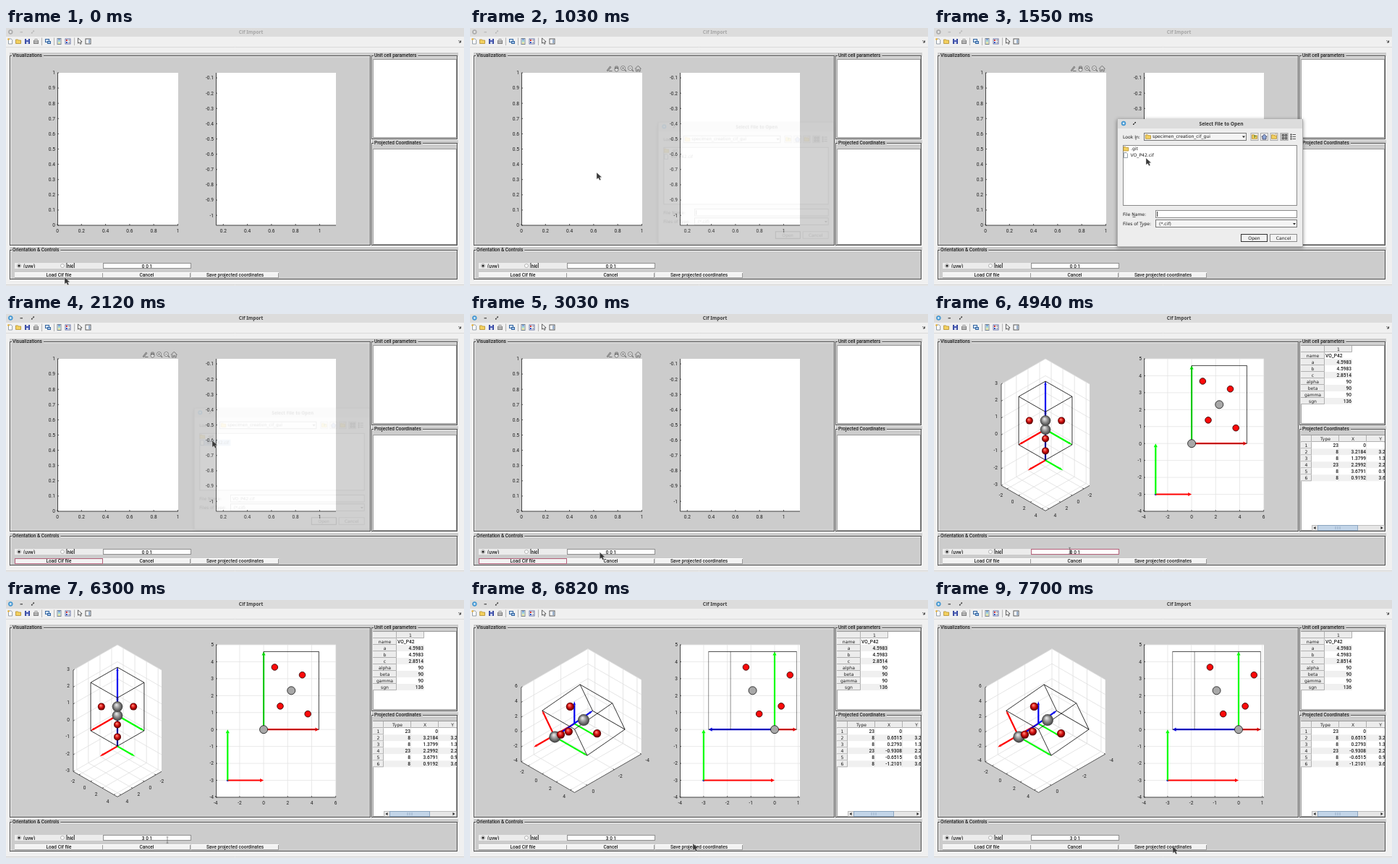
An HTML page with a canvas that plays this animation: 633x357 px, repeating every 8000 ms.

```html
<!DOCTYPE html>
<html lang="en">
<head>
<meta charset="utf-8">
<title>Cif Import</title>
<style>
html, body { margin: 0; width: 100%; height: 100%; overflow: hidden; background: #f0f0f0; }
canvas { display: block; width: 100vw; height: 100vh; }
</style>
</head>
<body>
<canvas id="stage"></canvas>
<script>
const W = 633, H = 357, LOOP = 8000;
const dpr = window.devicePixelRatio || 1;
function context(canvas) {
  canvas.width = W * dpr;
  canvas.height = H * dpr;
  const ctx = canvas.getContext('2d');
  ctx.scale(dpr, dpr);
  return ctx;
}
const layer = context(document.createElement('canvas'));
let g = context(document.getElementById('stage'));

const UI = 'Roboto, sans-serif', JAVA = '"DejaVu Sans", sans-serif', TITLE = '"Noto Sans", sans-serif';
const PANEL = '#cccccc', INK = '#1c1c1c', PINK = '#b4607a';
const RED = '#ff0000', GREEN = '#00ff00', BLUE = '#0000f0';

// ---- drawing helpers
function rect(x, y, w, h, fill, stroke) {
  if (fill) { g.fillStyle = fill; g.fillRect(x, y, w, h); }
  if (stroke) { g.strokeStyle = stroke; g.lineWidth = 1; g.strokeRect(x + .5, y + .5, w - 1, h - 1); }
}
function path(points, stroke, width = 1, fill, close) {
  g.beginPath();
  points.forEach(([x, y], i) => i ? g.lineTo(x, y) : g.moveTo(x, y));
  if (close) g.closePath();
  if (fill) { g.fillStyle = fill; g.fill(); }
  if (stroke) { g.strokeStyle = stroke; g.lineWidth = width; g.stroke(); }
}
const line = (x1, y1, x2, y2, color, width) => path([[x1, y1], [x2, y2]], color, width);
function disc(x, y, r, fill, stroke, width = 1) {
  g.beginPath();
  g.arc(x, y, r, 0, 7);
  if (fill) { g.fillStyle = fill; g.fill(); }
  if (stroke) { g.strokeStyle = stroke; g.lineWidth = width; g.stroke(); }
}
// y is the middle of the capitals
function text(s, x, y, align = 'left', font = UI, size = 6.5, weight = 500, color = INK) {
  g.font = `${weight} ${size}px ${font}`;
  g.textAlign = align;
  g.fillStyle = color;
  g.fillText(s, x, y + size * .36);
}
const tick = (s, x, y, align = 'center') => text(String(s), x, y, align, UI, 6.6, 400);
const java = (s, x, y, align) => text(s, x, y, align, JAVA, 6.1, 400);
const value = (s, x, y, align) => text(s, x, y, align, UI, 6.6, 500);
function clipped(x, y, w, h, draw) {
  g.save();
  g.beginPath();
  g.rect(x, y, w, h);
  g.clip();
  draw();
  g.restore();
}
function arrow(a, b, color, head) {
  const dx = b[0] - a[0], dy = b[1] - a[1], n = Math.hypot(dx, dy);
  if (n < 1) return disc(a[0], a[1], 1.5, color);
  const ux = dx / n, uy = dy / n, bx = b[0] - ux * 5, by = b[1] - uy * 5;
  line(a[0], a[1], bx, by, color, 2.2);
  path([b, [bx - uy * head, by + ux * head], [bx + uy * head, by - ux * head]], null, 0, color, true);
}
const range = (a, b, step = 1) => {
  const out = [];
  for (let v = Math.ceil(a / step) * step; v <= b + 1e-6; v += step) out.push(+v.toFixed(2) || 0);
  return out;
};

// ---- window frame
function titleButton(x, y, active) {
  disc(x, y, 2.9, active ? '#55a5dc' : '#b4b4b4', active ? '#2f86c4' : '#a4a4a4', .7);
  disc(x, y, 1.2, '#f4f4f4');
}
function expandMark(x, y, color) {
  line(x - 1.6, y + 1.6, x + 1.6, y - 1.6, color, .8);
  path([[x, y - 2], [x + 2, y - 2], [x + 2, y]], null, 0, color, true);
  path([[x, y + 2], [x - 2, y + 2], [x - 2, y]], null, 0, color, true);
}
function folder(x, y) {
  path([[x - 3.5, y - 2.5], [x - .5, y - 2.5], [x + .3, y - 1.5], [x + 3.5, y - 1.5], [x + 3.5, y + 3], [x - 3.5, y + 3]],
    '#a8821e', .7, '#f3d060', true);
}
function page(x, y) {
  path([[x - 2.5, y - 3.5], [x + 1, y - 3.5], [x + 2.5, y - 2], [x + 2.5, y + 3.5], [x - 2.5, y + 3.5]], '#6c7a88', .7, '#fff', true);
}
function arrowShape(x, y, k, fill, stroke) {
  const pts = [[0, 0], [0, 9], [2.3, 7.3], [4, 10.4], [5.7, 9.6], [4.3, 6.6], [7, 6.3]];
  path(pts.map(p => [x + p[0] * k, y + p[1] * k]), stroke, .7, fill, true);
}
function toolbar() {
  page(6, 18.5);
  disc(3.5, 15.5, 1.3, '#e8b030');
  folder(17, 18.5);
  rect(26, 15, 7, 7, '#4a5cb4', '#33449a');
  rect(28, 15, 3, 2, '#dfe4f4');
  rect(28, 19, 3, 3, '#c8d0ea');
  rect(38, 17, 7, 5, '#b4b4b4', '#808080');
  rect(39.5, 15, 4, 3, '#f8f8f8', '#909090');
  rect(54, 15, 6, 5, '#cfe0f4', '#3566a0');
  rect(57, 18, 5, 4, '#9cc0e8', '#3566a0');
  rect(70.5, 14, 6, 9, '#fff', '#76828e');
  ['#7fa6e0', '#9ad8d0', '#e8e4a0'].forEach((c, i) => rect(72, 15 + i * 2.3, 3, 2.3, c));
  rect(81.5, 14.5, 8, 8, '#fff', '#6470a4');
  [['#d03030', 17], ['#3050c0', 20]].forEach(([c, y]) => {
    rect(83, y - 1, 2, 2, c);
    line(86, y, 88.3, y, '#555', .8);
  });
  arrowShape(99.5, 14, .8, '#fff', '#222');
  rect(109.5, 14.5, 8, 8, '#fff', '#555');
  rect(114, 16, 2.5, 5, '#9ab0cc');
  [49.5, 66.5, 94.5].forEach(x => line(x, 13.5, x, 24, '#b4b4b4', 1));
  path([[625.5, 17], [628.5, 20], [628.5, 17.5], [628.5, 20], [626, 20]], '#333', .9);
}
// Etched border: a dark outline with a light one a pixel down and right
function panel(x, y, w, h, title) {
  rect(x, y, w, h, PANEL);
  rect(x + 1, y + 5, w - 1, h - 5, null, '#f6f6f6');
  rect(x, y + 4, w - 1, h - 5, null, '#4c4c4c');
  g.font = `500 6.5px ${UI}`;
  rect(x + 3, y + 2, g.measureText(title).width + 3, 6, PANEL);
  text(title, x + 4, y + 4);
}
function button(x, w, label, focus) {
  rect(x, 338, w, 8, '#f3f3f3');
  line(x, 345.5, x + w, 345.5, '#999', 1);
  line(x + w - .5, 338, x + w - .5, 346, '#999', 1);
  line(x, 338.5, x + w, 338.5, '#ffffff', 1);
  if (focus) rect(x, 338, w, 8, null, PINK);
  text(label, x + w / 2, 341.8, 'center');
}
function controls(s) {
  rect(12, 325, 122, 8, '#ececec');
  clipped(12, 325, 122, 7, () => {
    disc(18, 329, 2.5, '#fff', '#888', .7);
    disc(18, 329, 1.5, '#111');
    disc(78, 329, 2.5, '#fff', '#999', .7);
    text('(uvw)', 24, 329.2);
    text('[hkl]', 83, 329.2);
  });
  rect(134, 325, 122, 8, '#fff', s.editFocus ? PINK : '#8e8e8e');
  clipped(135, 325, 120, 8, () => {
    if (s.selected) rect(188.5, 326, 13, 6, '#9fc3e8');
    text(s.entry, 195, 329.2, 'center');
  });
  if (s.caret) line(189, 326, 189, 332, '#111', .7);
  button(12, 122, 'Load Cif file', s.loadFocus);
  button(134, 121, 'Cancel');
  button(256, 121, 'Save projected coordinates');
}
function axesTools() {
  const c = '#707070', y = 56;
  path([[189, 59], [193.5, 53], [195, 54.2], [190.8, 59.4]], c, .8, '#a0a0a0', true);
  line(192, 59.5, 196.5, 59.5, c, 1);
  disc(202.5, 57.5, 2.6, '#e4e4e4', c, .9);
  [200.4, 201.8, 203.3, 204.8].forEach((x, i) => line(x, 57, x, i % 3 ? 52.3 : 53.4, c, .9));
  [212, 222].forEach((x, i) => {
    disc(x - .5, y - .5, 3, '#e4e4e4', c, .9);
    line(x + 1.7, y + 1.7, x + 4, y + 4, c, 1.2);
    line(x - 2, y - .5, x + 1, y - .5, c, .8);
    if (!i) line(x - .5, y - 2, x - .5, y + 1, c, .8);
  });
  path([[228, 56.5], [232.3, 52.2], [236.6, 56.5]], c, 1);
  path([[229.5, 56], [229.5, 60], [231.5, 60], [231.5, 57.5], [233.2, 57.5], [233.2, 60], [235.2, 60], [235.2, 56]], c, .9);
}

// ---- plots
const CELL = 4.5983, HEIGHT = 2.8514;
const ATOMS = [
  ['V', 0, 0, 0], ['O', 3.2184, 3.2184, 0], ['O', 1.3799, 1.3799, 0],
  ['V', 2.2992, 2.2992, HEIGHT / 2], ['O', 3.6791, .9192, HEIGHT / 2], ['O', .9192, 3.6791, HEIGHT / 2]
];
// Turn that brings the zone axis [u 0 w] upright
function zone(u, w) {
  const n = Math.hypot(u * CELL, w * HEIGHT);
  return { c: w * HEIGHT / n, s: u * CELL / n };
}
const VIEWS = [
  { ...zone(0, 1), o: [154, 159.8], u: [[-8.03, 4.6], [8.03, 4.6], [0, -23.4]], lim: [[-3, 4.6], [-3, 4.6], [-3, 3]],
    zStep: 1, r: { V: 7.3, O: 5 }, x0: 356.1, sx: 16.6, xLim: [-4, 6], xStep: 2 },
  { ...zone(3, 1), o: [117.3, 189.4], u: [[-18.7, 10.8], [9.7, 5.6], [0, -10.3]], lim: [[-4, .93], [-3, 4.6], [-4, 6]],
    zStep: 2, r: { V: 8, O: 5.6 }, x0: 421, sx: 32.7, xLim: [-4, 1], xStep: 1 }
];
const turn = (v, [x, y, z]) => [v.c * x - v.s * z, y, v.s * x + v.c * z];
const project = (v, p) => [0, 1].map(k => v.o[k] + p.reduce((sum, q, i) => sum + q * v.u[i][k], 0));
const depth = (v, [x, y, z]) => 1.414 * (v.u[0][1] * x + v.u[1][1] * y) - .707 * v.u[2][1] * z;

// Cell edges as pairs of turned points; `near` picks those that meet the corner at zero
function edges(v, near) {
  const size = [CELL, CELL, HEIGHT], out = [];
  for (let n = 0; n < 8; n++) for (let k = 0; k < 3; k++) {
    if (n >> k & 1 || (n === 0) !== near) continue;
    const corner = m => turn(v, size.map((q, i) => (m >> i & 1) * q));
    out.push([corner(n), corner(n | 1 << k)]);
  }
  return out;
}
function vectors(v, map, head) {
  const colors = [RED, GREEN, BLUE], unit = k => [0, 1, 2].map(i => +(i === k));
  const order = [2, 0, 1];
  order.forEach(k => arrow(map([-3, -3, -3]), map(unit(k).map(q => q * 3 - 3)), colors[k], head));
  order.forEach(k => {
    const len = k === 2 ? HEIGHT : CELL;
    arrow(map([0, 0, 0]), map(turn(v, unit(k).map(q => q * len))), colors[k], head);
  });
}
function cellAndArrows(v, map, head, width) {
  const draw = near => edges(v, near).forEach(([a, b]) => line(...map(a), ...map(b), '#000', width));
  draw(true);
  vectors(v, map, head);
  draw(false);
}
function sphere(x, y, r, el) {
  const k = g.createRadialGradient(x - r * .2, y - r * .35, r * .1, x, y, r);
  const stops = el === 'V' ? ['#e0e0e0', '#8c8c8c', '#3c3c3c'] : ['#ff8070', '#d00c0c', '#4c0000'];
  stops.forEach((c, i) => k.addColorStop([0, .5, 1][i], c));
  disc(x, y, r, k);
}
function plot3d(v) {
  const [[xa, xb], [ya, yb], [za, zb]] = v.lim;
  const P = (...p) => project(v, p);
  path([P(xb, ya, zb), P(xa, ya, zb), P(xa, yb, zb), P(xa, yb, za), P(xb, yb, za), P(xb, ya, za)], null, 0, '#fff', true);
  const grid = '#dfdfdf', xs = range(xa, xb, 2), ys = range(ya, yb, 2), zs = range(za, zb, v.zStep);
  xs.forEach(x => path([P(x, yb, za), P(x, ya, za), P(x, ya, zb)], grid, .8));
  ys.forEach(y => path([P(xb, y, za), P(xa, y, za), P(xa, y, zb)], grid, .8));
  zs.forEach(z => path([P(xb, ya, z), P(xa, ya, z), P(xa, yb, z)], grid, .8));
  path([P(xb, ya, zb), P(xb, ya, za), P(xb, yb, za), P(xa, yb, za)], '#303030', .8);
  xs.forEach(x => {
    const [px, py] = P(x, yb, za);
    line(px, py, px - 1.7, py - 1, '#303030', .8);
    tick(x, px + 8.5, py + 8.6);
  });
  ys.forEach(y => {
    const [px, py] = P(xb, y, za);
    line(px, py, px + 1.7, py - 1, '#303030', .8);
    tick(y, px - 8.5, py + 8.6);
  });
  zs.forEach(z => {
    const [px, py] = P(xb, ya, z);
    line(px, py, px + 1.7, py - 1, '#303030', .8);
    tick(z, px - 5, py - 1.8, 'right');
  });
  cellAndArrows(v, p => project(v, p), 1.6, .8);
  ATOMS.map(([el, ...p]) => [el, turn(v, p)])
    .sort((a, b) => depth(v, a[1]) - depth(v, b[1]))
    .forEach(([el, p]) => sphere(...project(v, p), v.r[el], el));
}
function plot2d(v) {
  const X = x => v.x0 + x * v.sx, Y = y => 179.2 - y * 23.44;
  frame(290, 456);
  range(...v.xLim, v.xStep).forEach(x => {
    line(X(x), 62, X(x), 273, '#e4e4e4', .8);
    tickX(x, X(x));
  });
  range(-4, 5).forEach(y => {
    line(290, Y(y), 456, Y(y), '#e4e4e4', .8);
    tickY(y, 290, Y(y));
  });
  axisLines(290, 456);
  cellAndArrows(v, ([x, y]) => [X(x), Y(y)], 2.6, .45);
  ATOMS.forEach(([el, ...p]) => {
    const [x, y] = turn(v, p), big = el === 'V';
    disc(X(x), Y(y), big ? 5.5 : 4.3, big ? '#a8a8a8' : '#ff0a0a', big ? '#222' : '#300000', .9);
  });
}
const frame = (x1, x2) => rect(x1, 62, x2 - x1, 211, '#fff');
const axisLines = (x1, x2) => path([[x1 + .5, 62], [x1 + .5, 273], [x2, 273]], '#303030', .9);
function tickX(label, x) {
  line(x, 273, x, 271, '#303030', .8);
  tick(label, x, 280.3);
}
function tickY(label, x, y) {
  line(x, y, x + 2, y, '#303030', .8);
  tick(label, x - 3, y, 'right');
}
function emptyPlots() {
  frame(71, 238);
  axisLines(71, 238);
  range(0, 1, .2).forEach(v => tickX(v, 71 + v * 166.5));
  range(0, 1, .1).forEach(v => tickY(v, 71, 273 - v * 211));
  frame(290, 456);
  axisLines(290, 456);
  range(.2, 1, .2).forEach(v => tickX(v, 267 + v * 166.5));
  range(-1, -.1, .1).forEach(v => tickY(v, 290, 47.9 - v * 211.3));
}

// ---- tables
const stripe = i => i % 2 ? '#f0f0f0' : '#fff';
function headCell(x, y, w, label) {
  rect(x, y, w, 9, '#ececec');
  path([[x, y + 8.5], [x + w - .5, y + 8.5], [x + w - .5, y]], '#a2a2a2', .8);
  java(label, x + w / 2, y + 4.6, 'center');
}
function cellTable(filled) {
  const rows = { name: 'VO_P42', a: '4.5983', b: '4.5983', c: '2.8514', alpha: '90', beta: '90', gamma: '90', sgn: '136' };
  headCell(507, 44, 33, '');
  headCell(540, 44, 38, '1');
  Object.keys(rows).forEach((key, i) => {
    const y = 53 + i * 9;
    headCell(507, y, 33, key);
    rect(540, y, 38, 9, stripe(i));
    if (filled) value(rows[key], i ? 577 : 541, y + 4.6, i ? 'right' : 'left');
  });
}
function coordTable(view) {
  clipped(507, 167, 116, 133, () => {
    headCell(507, 168, 15, '');
    ['Type', 'X', 'Y'].forEach((h, i) => headCell(522 + i * 38, 168, 38, h));
    ATOMS.forEach(([el, ...p], i) => {
      const y = 177.3 + i * 9;
      headCell(507, y, 15, String(i + 1));
      rect(522, y, 114, 9, stripe(i));
      [560, 598].forEach(x => line(x - .5, y, x - .5, y + 9, '#e0e0e0', .7));
      if (!view) return;
      const [x, yy] = turn(view, p), show = n => n ? n.toFixed(4) : '0';
      [el === 'V' ? '23' : '8', show(x), show(yy)].forEach((s, k) => value(s, 559 + k * 38, y + 4.6, 'right'));
    });
    rect(522, 292, 101, 8, '#e6e6e6', '#bcbcbc');
    rect(530, 292, 56, 8, '#c3d5e8', '#8ba4bf');
    [555, 558, 561].forEach(x => line(x, 294, x, 298, '#8ba4bf', .8));
    path([[527.5, 294], [524.5, 296], [527.5, 298]], null, 0, '#222', true);
    path([[617.5, 294], [620.5, 296], [617.5, 298]], null, 0, '#222', true);
  });
}

// ---- file dialog
const dropMark = (x, y) => path([[x - 2, y - 1], [x + 2, y - 1], [x, y + 1.5]], null, 0, '#222', true);
function dialog(selected) {
  g.save();
  g.shadowColor = 'rgba(0,0,0,.45)';
  g.shadowBlur = 5 * dpr;
  g.shadowOffsetY = dpr;
  rect(253, 126, 257, 177, '#ededed');
  g.restore();
  rect(253, 126, 257, 177, '#ededed', '#b0b0b0');
  rect(254, 126, 255, 13, '#dcdcdc');
  titleButton(262, 132, true);
  expandMark(277, 132, '#222');
  text('Select File to Open', 397, 132.4, 'center', TITLE, 6.6, 600, '#333');
  java('Look In:', 261, 150.5);
  line(278, 154, 280, 154, INK, .6);
  rect(290, 145, 142, 11, '#f4f4f4', '#777');
  folder(296, 150.3);
  java('specimen_creation_cif_gui', 302, 150.3);
  dropMark(428, 150.5);
  [443, 456.5, 470, 484, 496].forEach((x, i) => rect(x - 5.5, 145, 11, 11, i === 3 ? '#c4c4c4' : '#eee', i < 4 ? '#aaa' : null));
  folder(443, 150.3);
  path([[443, 152], [443, 148.5], [445, 150.5]], '#307030', .9);
  path([[453, 150.5], [456.5, 147], [460, 150.5], [459, 150.5], [459, 154], [454, 154], [454, 150.5]], '#335', .8, '#8fa8d8', true);
  folder(470, 150.3);
  disc(472.5, 148, 1.3, '#fff', '#b08020', .6);
  for (let i = 0; i < 4; i++) rect(481 + i % 2 * 4, 147 + (i >> 1) * 4, 3, 3, '#fff', '#444');
  [147.5, 150.5, 153.5].forEach(y => { rect(492.5, y - 1, 2, 2, '#444'); line(495.5, y, 500, y, '#444', .9); });
  rect(261, 162, 241, 84, '#fff', '#8a8a8a');
  if (selected) rect(261.5, 171.5, 45, 9, '#a9c4e2');
  folder(265.3, 167);
  page(265, 176);
  java('.git', 272, 167);
  java('VO_P42.cif', 271.5, 176);
  java('File Name:', 261, 258);
  line(274.5, 261.5, 278.5, 261.5, INK, .6);
  rect(306, 252, 196, 11, '#fff', '#8a8a8a');
  if (selected) java('VO_P42.cif', 309, 257.6);
  else line(308.7, 254, 308.7, 261, '#111', .9);
  java('Files of Type:', 261, 271.3);
  line(285, 274.8, 288.5, 274.8, INK, .6);
  rect(306, 265, 196, 11, '#f4f4f4', '#777');
  java('(*.cif)', 311, 270.6);
  dropMark(498, 271);
  rect(424, 285, 37, 11, '#f2f2f2', '#333');
  java('Open', 442.5, 290.5, 'center');
  rect(464, 285, 38, 11, '#f2f2f2', '#8c8c8c');
  java('Cancel', 483, 290.5, 'center');
}
// Draws the dialog on its own layer, so that it fades as a whole
function fadeDialog(k, selected) {
  if (k >= 1) return dialog(selected);
  const stage = g, zoom = .94 + .06 * k;
  g = layer;
  g.clearRect(0, 0, W, H);
  dialog(selected);
  g = stage;
  g.save();
  g.globalAlpha = k;
  g.translate(381.5, 214.5);
  g.scale(zoom, zoom);
  g.drawImage(layer.canvas, -381.5, -214.5, W, H);
  g.restore();
}

// ---- timeline
const PATH = [
  [0, 81, 345], [119, 81, 345], [120, 76.5, 341], [450, 77, 341], [790, 175, 200], [1030, 175, 200],
  [1550, 293, 180], [1730, 285, 175], [2160, 285, 175], [2640, 196, 345], [2670, 196, 345], [3240, 172, 323],
  [3450, 172, 323], [3600, 97, 321.5], [3970, 97, 321.5], [4420, 187, 327], [4610, 187, 327], [4640, 187.5, 327.5],
  [5149, 187.5, 327.5], [5150, 252, 328], [5450, 252, 328], [5640, 223, 332], [6480, 223, 332], [6940, 325, 338],
  [7180, 325, 338], [7330, 313, 336], [7480, 329, 339], [7640, 329, 339], [7700, 330, 341], [8000, 330, 341]
];
const clamp = k => Math.max(0, Math.min(1, k));
const within = (t, a, b) => t >= a && t < b;
function pointer(t) {
  const i = PATH.findIndex(p => p[0] > t), a = PATH[i - 1], b = PATH[i];
  const k = clamp((t - a[0]) / (b[0] - a[0])), e = k * k * (3 - 2 * k);
  return [a[1] + (b[1] - a[1]) * e, a[2] + (b[2] - a[2]) * e];
}
function drawPointer(t) {
  const [x, y] = pointer(t);
  if (!within(t, 4350, 6540)) return arrowShape(x, y, 1.03, '#383838', 'rgba(225,225,225,.6)');
  line(x, y - 4, x, y + 4, '#555', .6);
  [-4.2, 4.2].forEach(d => line(x - 1.4, y + d, x + 1.4, y + d, '#555', .6));
}

function draw(t) {
  const active = within(t, 330, 1030) || t >= 2000;
  const view = t < 3480 ? null : VIEWS[+(t >= 6600)];
  rect(0, 0, W, H, '#f0f0f0');
  rect(0, 0, W, 12, '#dcdcdc');
  titleButton(6.3, 5.5, active);
  const mark = active ? '#222' : '#b0b0b0';
  line(19.5, 5.8, 23, 5.8, mark, 1);
  expandMark(37, 5.5, mark);
  text('Cif Import', 338.5, 6, 'center', TITLE, 6.6, 600, active ? '#3c3c3c' : '#a6a6a6');
  toolbar();
  line(0, 26.5, W, 26.5, '#dadada', 1);

  panel(5, 34, 500, 268, 'Visualizations');
  panel(505, 34, 120, 121, 'Unit cell parameters');
  panel(505, 155, 120, 147, 'Projected Coordinates');
  panel(5, 303, 620, 46, 'Orientation & Controls');
  line(0, 355.5, W, 355.5, '#d0d0d0', 1);
  rect(507, 43, 116, 109, '#fff', '#9a9a9a');
  rect(507, 167, 116, 133, '#fff', '#9a9a9a');

  if (view) {
    plot3d(view);
    plot2d(view);
    cellTable(t >= 3760);
    coordTable(t >= 3760 ? view : null);
  } else emptyPlots();
  if (within(t, 700, 4200)) axesTools();

  controls({
    loadFocus: within(t, 330, 1030) || within(t, 2000, 4940),
    editFocus: within(t, 4940, 6300),
    caret: within(t, 4940, 5150),
    selected: within(t, 5150, 5450),
    entry: t < 5450 ? '0 0 1' : t < 6120 ? '3' : t < 6300 ? '3 0' : '3 0 1'
  });
  if (within(t, 1030, 2160)) {
    const k = Math.min(clamp((t - 1010) / 180), clamp((2140 - t) / 160));
    if (k > 0) fadeDialog(k, t >= 1850);
  }
  drawPointer(t);
}

function play(now) {
  draw(now % LOOP);
  requestAnimationFrame(play);
}
requestAnimationFrame(play);
</script>
</body>
</html>
```
